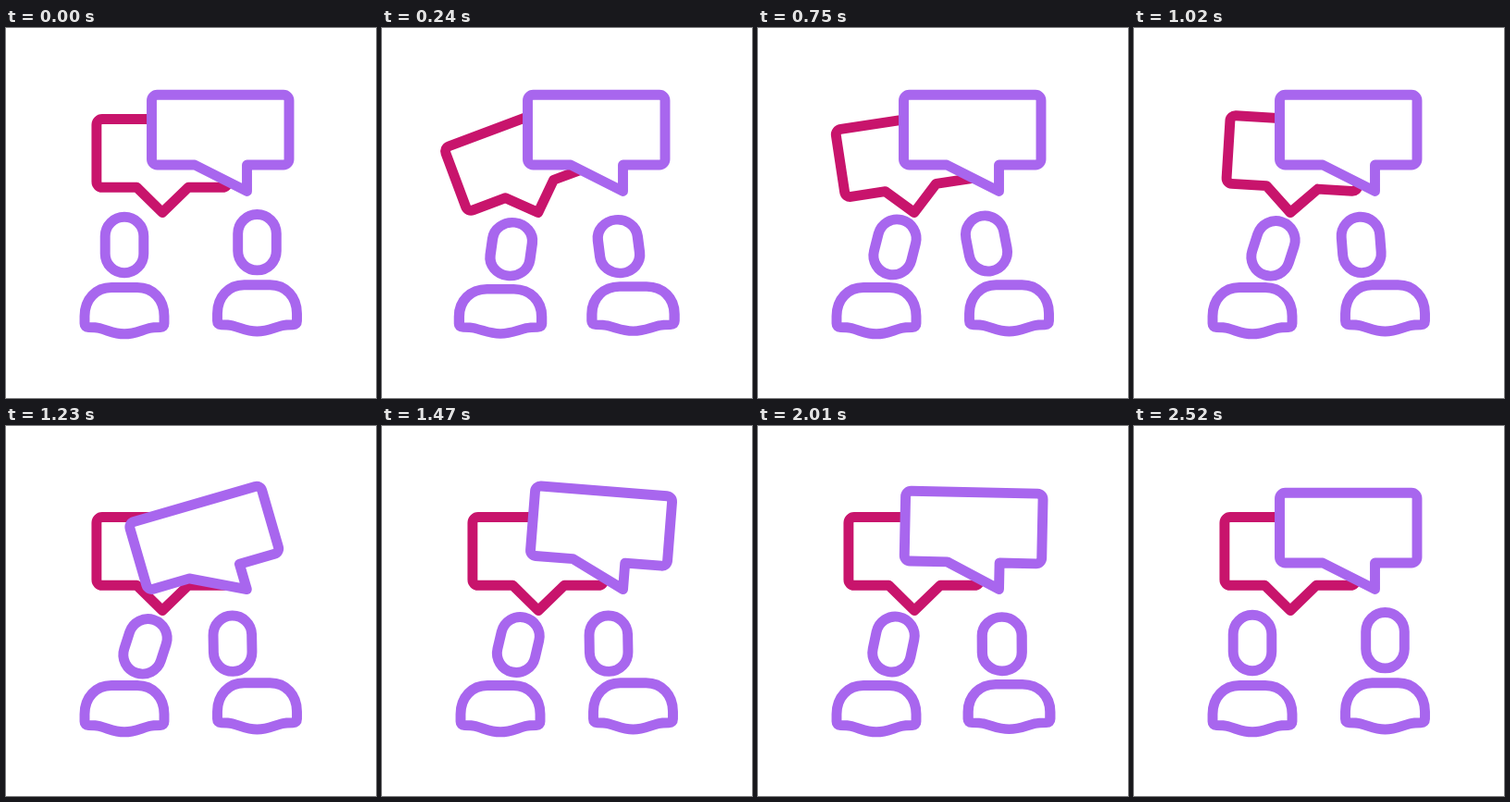
Recreate the animation shown at these times as an HTML page with a canvas. Size 400x400 px, loop 3.55 s.

```html
<!DOCTYPE html>
<html lang="en">
<head>
<meta charset="utf-8">
<title>Conversation</title>
<style>
  html, body { margin: 0; width: 100%; height: 100%; overflow: hidden; background: #fff; }
  canvas { display: block; width: 100vw; height: 100vh; object-fit: contain; }
</style>
</head>
<body>
<canvas id="stage" width="400" height="400"></canvas>
<script>
const ctx = document.getElementById('stage').getContext('2d');
const LOOP = 3550, STEP = 30, END = 2520;
const PURPLE = '#a866ee', RED = '#c8146c';
const PURPLE_DELAY = 1080;
const BASE = 88; // from head centre down to the foot of the body

const rad = deg => deg * Math.PI / 180;

// Eased step from 0 to 1 between times a and b
function ramp(t, a, b) {
  const u = Math.min(1, Math.max(0, (t - a) / (b - a)));
  return (1 - Math.cos(Math.PI * u)) / 2;
}

// Rises over one span and falls back over another
const pulse = (t, a, b, c, d) => ramp(t, a, b) - ramp(t, c, d);

// Bubble angle: a fading swing to and fro that comes to rest
const swing = t =>
  -21 * pulse(t, 0, 220, 220, 490) +
  15.5 * pulse(t, 220, 490, 490, 760) -
  8.7 * pulse(t, 490, 760, 760, 1000) +
  3.6 * pulse(t, 760, 1000, 1000, 1200);

function bubblePath(l, t, r, b, tail) {
  const p = new Path2D(), c = 6;
  p.moveTo(l + c, t);
  p.arcTo(r, t, r, b, c);
  p.arcTo(r, b, l, b, c);
  for (const [x, y] of tail) p.lineTo(x, y);
  p.arcTo(l, b, l, t, c);
  p.arcTo(l, t, r, t, c);
  p.closePath();
  return p;
}

const redBubble = bubblePath(97.9, 98.5, 240, 172.3, [[197, 172.3], [169, 199.5], [141.5, 172.3]]);
const purpleBubble = bubblePath(157.5, 72.3, 306, 148, [[260.5, 148], [260.5, 176.5], [204, 148]]);
const head = new Path2D();
head.roundRect(-20.8, -30.2, 41.6, 60.4, 20.8);
// Centred on the head, so both people share it
const body = new Path2D('M-43 85V77C-43 59-31 46-14 46H14C31 46 43 59 43 77V85Q43 89 39 89' +
  'C34 89 31 89 27 90C16 93 11 96.3 0 96.3C-11 96.3-16 93-27 90C-31 89-34 89-39 89Q-43 89-43 85Z');

function drawBubble(path, color, x, y, angle) {
  ctx.save();
  ctx.translate(x, y);
  ctx.rotate(rad(angle));
  ctx.translate(-x, -y);
  ctx.fillStyle = '#fff';
  ctx.fill(path);
  ctx.strokeStyle = color;
  ctx.stroke(path);
  ctx.restore();
}

// The head moves to a pose while the whole person squashes halfway there
function drawPerson(x, y, lean, dx, dy, tilt) {
  const squash = Math.sin(Math.PI * lean);
  ctx.save();
  ctx.translate(x, y + BASE);
  ctx.scale(1 + 0.04 * squash, 1 - 0.045 * squash);
  ctx.translate(0, -BASE);
  ctx.strokeStyle = PURPLE;
  ctx.stroke(body);
  ctx.translate(dx, dy);
  ctx.rotate(rad(tilt));
  ctx.stroke(head);
  ctx.restore();
}

function drawLeft(t) {
  const lean = pulse(t, 0, 420, 2030, 2460);
  const nod = pulse(t, 600, 960, 1260, 1560);
  drawPerson(128, 234.5, lean, 18.5 * lean + 4 * nod, 1.5 * lean + 2.3 * nod, 12 * lean + 6 * nod);
}

function drawRight(t) {
  const lean = pulse(t, 0, 420, 1830, 2110);
  const nod = pulse(t, 840, 1140, 1830, 2110);
  drawPerson(271.5, 231.7, lean, -24.5 * lean - 2 * nod, 1.2 * lean + 2.3 * nod, -11 * lean + 10 * nod);
}

function draw(t) {
  ctx.fillStyle = '#fff';
  ctx.fillRect(0, 0, 400, 400);
  ctx.lineWidth = 10.9;
  ctx.lineJoin = 'round';
  drawBubble(redBubble, RED, 169, 200, swing(t));
  drawBubble(purpleBubble, PURPLE, 260.5, 177, swing(t - PURPLE_DELAY));
  drawLeft(t);
  drawRight(t);
}

const start = performance.now();
function tick() {
  const t = (performance.now() - start) % LOOP;
  draw(Math.min(END, Math.floor(t / STEP) * STEP));
  requestAnimationFrame(tick);
}
tick();
</script>
</body>
</html>
```
